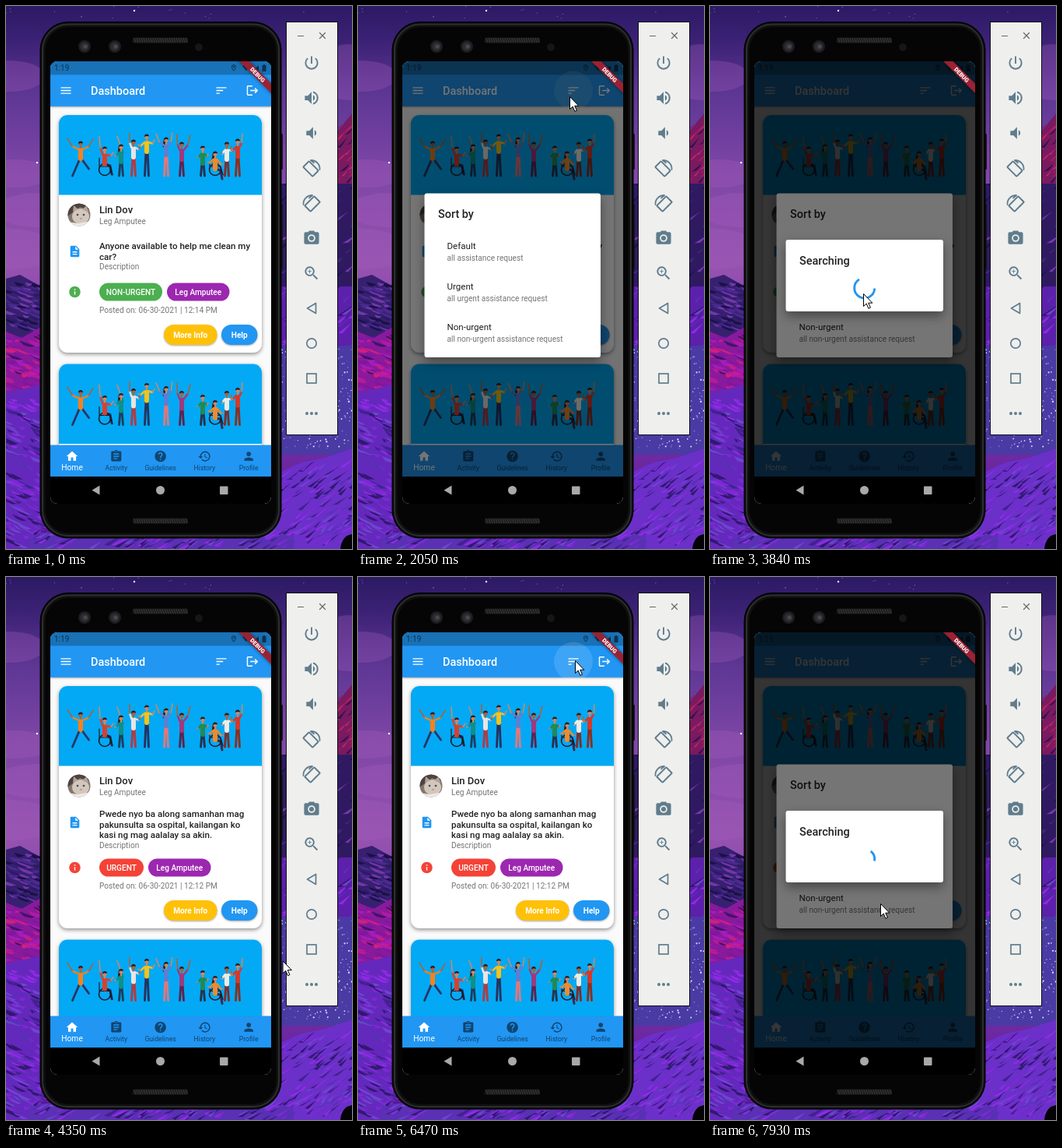
These frames come from a looping animation (445 px wide and 697 px high, 8000 ms). An HTML page:

```html
<!DOCTYPE html>
<html lang="en">
<head>
<meta charset="utf-8">
<title>Dashboard demo</title>
<style>
html, body { margin: 0; width: 100%; height: 100%; overflow: hidden; background: #24184f; }
svg { display: block; width: 445px; height: 697px; font-family: Roboto, sans-serif; }
.card { filter: drop-shadow(0 2px 2.5px rgba(0,0,0,.42)); }
.btn { filter: drop-shadow(0 1px 1px rgba(0,0,0,.35)); }
.dlg { filter: drop-shadow(0 6px 7px rgba(0,0,0,.4)); }
</style>
</head>
<body>
<svg id="stage" viewBox="0 0 445 697" xmlns="http://www.w3.org/2000/svg"></svg>
<script>
const LOOP = 8000;
const BLUE = '#2196f3', INK = '#212121', GRAY = '#757575', STEEL = '#607d8b', DIM = '#0f4570';

const ICONS = {
  menu: 'M3 18h18v-2H3zm0-5h18v-2H3zm0-7v2h18V6z',
  sort: 'M3 18h6v-2H3zM3 6v2h18V6zm0 7h12v-2H3z',
  logout: 'M17 7l-1.4 1.4L18.2 11H8v2h10.2l-2.6 2.6L17 17l5-5zM4 5h8V3H4a2 2 0 0 0-2 2v14a2 2 0 0 0 2 2h8v-2H4z',
  doc: 'M14 2H6a2 2 0 0 0-2 2v16a2 2 0 0 0 2 2h12a2 2 0 0 0 2-2V8zm2 16H8v-2h8zm0-4H8v-2h8zm-3-5V3.5L18.5 9z',
  info: 'M12 2a10 10 0 1 0 0 20a10 10 0 0 0 0-20zm1 15h-2v-6h2zm0-8h-2V7h2z',
  home: 'M10 20v-6h4v6h5v-8h3L12 3 2 12h3v8z',
  task: 'M19 3h-4.2a3 3 0 0 0-5.6 0H5a2 2 0 0 0-2 2v14a2 2 0 0 0 2 2h14a2 2 0 0 0 2-2V5a2 2 0 0 0-2-2zm-7 0a1 1 0 1 1 0 2a1 1 0 0 1 0-2zm2 14H7v-2h7zm3-4H7v-2h10zm0-4H7V7h10z',
  help: 'M12 2a10 10 0 1 0 0 20a10 10 0 0 0 0-20zm1 17h-2v-2h2zm2.1-7.7l-.9.9c-.8.7-1.2 1.3-1.2 2.8h-2v-.5c0-1.1.5-2.1 1.2-2.8l1.2-1.3a2 2 0 1 0-3.4-1.4H8a4 4 0 1 1 7.1 2.3z',
  history: 'M13 3a9 9 0 0 0-9 9H1l4 4 4-4H6a7 7 0 1 1 2 5l-1.4 1.4A9 9 0 1 0 13 3zm-1 5v5l4.3 2.5.7-1.2-3.5-2.1V8z',
  person: 'M12 12a4 4 0 1 0 0-8a4 4 0 0 0 0 8zm0 2c-2.7 0-8 1.3-8 4v2h16v-2c0-2.7-5.3-4-8-4z',
  power: 'M13 3h-2v10h2zm4.8 2.2l-1.4 1.4a7 7 0 1 1-8.8 0L6.2 5.2a9 9 0 1 0 11.6 0z',
  loud: 'M3 9v6h4l5 5V4L7 9zm13.5 3A4.5 4.5 0 0 0 14 8v8a4.5 4.5 0 0 0 2.5-4zM14 3.2v2.1a7 7 0 0 1 0 13.4v2.1a9 9 0 0 0 0-17.6z',
  quiet: 'M18.5 12A4.5 4.5 0 0 0 16 8v8a4.5 4.5 0 0 0 2.5-4zM5 9v6h4l5 5V4L9 9z',
  camera: 'M12 8.8a3.2 3.2 0 1 0 0 6.4a3.2 3.2 0 0 0 0-6.4zM9 2L7.2 4H4a2 2 0 0 0-2 2v12a2 2 0 0 0 2 2h16a2 2 0 0 0 2-2V6a2 2 0 0 0-2-2h-3.2L15 2zm3 15a5 5 0 1 1 0-10a5 5 0 0 1 0 10z',
  zoom: 'M15.5 14h-.8l-.3-.3A6.5 6.5 0 1 0 13.7 14.4l.3.3v.8l5 5 1.5-1.5zm-6 0a4.5 4.5 0 1 1 0-9a4.5 4.5 0 0 1 0 9zM12 10h-2v2H9v-2H7V9h2V7h1v2h2z',
  pin: 'M12 2a7 7 0 0 0-7 7c0 5.2 7 13 7 13s7-7.8 7-13a7 7 0 0 0-7-7zm0 2a5 5 0 0 1 5 5c0 2.9-2.9 7.2-5 9.9C9.9 16.2 7 11.9 7 9a5 5 0 0 1 5-5zm0 2.5a2.5 2.5 0 1 0 0 5a2.5 2.5 0 0 0 0-5z'
};

const rect = (x, y, w, h, fill, r = 0, extra = '') =>
  `<rect x="${x}" y="${y}" width="${w}" height="${h}" rx="${r}" fill="${fill}" ${extra}/>`;
const circle = (x, y, r, fill, extra = '') => `<circle cx="${x}" cy="${y}" r="${r}" fill="${fill}" ${extra}/>`;
const path = (d, fill, extra = '') => `<path d="${d}" fill="${fill}" ${extra}/>`;
const line = (d, color, w, extra = '') =>
  path(d, 'none', `stroke="${color}" stroke-width="${w}" stroke-linecap="round" stroke-linejoin="round" ${extra}`);
const text = (s, x, y, size, fill, weight = 400, anchor = 'start') =>
  `<text x="${x}" y="${y}" font-size="${size}" fill="${fill}" font-weight="${weight}" text-anchor="${anchor}">${s}</text>`;
const icon = (name, x, y, fill, size = 17.4) =>
  path(ICONS[name], fill, `fill-rule="evenodd" transform="translate(${x - size / 2} ${y - size / 2}) scale(${size / 24})"`);
const gradient = (id, ...stops) =>
  `<linearGradient id="${id}" x2="0" y2="1">${stops.map(([o, c]) => `<stop offset="${o}" stop-color="${c}"/>`).join('')}</linearGradient>`;

let seed = 11;
const rnd = (a = 0, b = 1) => a + (b - a) * ((seed = seed * 16807 % 2147483647) / 2147483647);
const many = (n, f) => Array.from({ length: n }, (_, i) => f(i)).join('');

// Thin slivers of rock that lean along a slope
const rocks = (n, x0, x1, y0, y1, colors, lean) => many(n, () => {
  const w = rnd(8, 24), h = rnd(1.5, 4);
  return path(`M${rnd(x0, x1).toFixed(1)} ${rnd(y0, y1).toFixed(1)}l${w} ${w * lean - h}l${-w * .3} ${h - w * lean * .2}l${-w * .4} ${h * .9 - w * lean * .5}z`,
    colors[Math.floor(rnd(0, colors.length))]);
});

function scenery() {
  const violet = ['#8f2be4', '#7a2ad2', '#30196f', '#5a2fb8', '#6e45cf', '#43208f'];
  const dusk = ['#1b1148', '#4a2a90', '#7238ac', '#2d1a66'];
  const magenta = ['#c01a94', '#a51cba', '#421468', '#7d189e', '#d0207e'];
  return rect(0, 0, 445, 697, 'url(#sky)') +
    [[4, 90, 46, 20], [10, 215, 50, 18], [40, 262, 55, 22], [5, 312, 60, 26], [440, 85, 40, 36]].map(([x, y, a, b]) =>
      `<ellipse cx="${x}" cy="${y}" rx="${a}" ry="${b}" fill="#a55cba" opacity=".3"/>`).join('') +
    many(16, () => circle(rnd(0, 445), rnd(0, 19), .5, '#a98bd8')) +
    circle(165, 6, 1.2, '#fff') + circle(40, 201, 1.2, '#fff') +
    path('M0 350L18 345 45 360V430H0z', '#37206f') + rocks(60, -14, 42, 354, 412, dusk, .5) +
    path('M0 418L20 426 45 412V500H0z', '#8a1a9c') + rocks(70, -14, 42, 420, 490, magenta, .5) +
    path('M0 496L45 486V697H0z', '#6428bc') + rocks(170, -14, 48, 498, 697, violet, .6) +
    path('M427 160L445 138V240H427z', '#7a1a60') + rocks(36, 414, 445, 156, 228, ['#c02468', '#7c1a66', '#2e1450', '#a01c60'], -.7) +
    rect(350, 228, 95, 140, '#2f1a62') + rocks(60, 346, 445, 230, 360, dusk, -.5) +
    rect(350, 360, 95, 80, '#5c20aa') + rocks(60, 346, 445, 362, 440, violet, -.5) +
    rect(350, 436, 95, 140, '#4a3aa4') +
    many(260, () => circle(rnd(352, 445), rnd(437, 568), rnd(.4, 1.2), rnd() > .4 ? '#dedcfa' : '#7f78d4')) +
    path('M340 604L380 586 410 580 445 568V697H340z', '#6a30c8') + rocks(150, 340, 445, 592, 697, violet, -.45) +
    rect(30, 676, 340, 21, '#5a30b4') + rocks(120, 30, 370, 676, 697, violet, -.3) +
    path('M430 697C431 686 436 679 445 678V697z', '#050308');
}

function phone() {
  const grille = y => rect(163, y, 71, 7, '#1c1c1c', 2) +
    many(23, i => line(`M${165 + i * 3} ${y + 1}l2 5`, '#3f3f3f', .9));
  const lens = x => circle(x, 52, 8, '#1d1d1f') + circle(x, 52, 5.5, '#2e2d33') + circle(x + 1, 52, 2.6, '#50444c');
  return rect(352, 164, 4, 46, '#161616', 1) + rect(352, 254, 4, 84, '#161616', 1) +
    rect(44, 20.5, 310, 662.5, '#0a0a0a', 36, 'stroke="#000"') +
    rect(47, 23.5, 304, 656.5, '#101010', 33, 'stroke="#2e2e2e" stroke-width="2"') +
    rect(50.5, 27, 297, 649.5, '#050505', 30) +
    lens(101) + lens(140) + circle(248, 53, 5, '#161618') + grille(40.5) + grille(657.5);
}

// x, head y, shirt, trousers, left hand, right hand, seated
const CROWD = [
  [96, 177, '#f5821f', '#2a3566', 79, 170, 112, 171],
  [127, 184, '#d9402f', '#27305c', 120, 167, 138, 188, 1],
  [148, 181, '#0f8f86', '#1c3f5c', 140, 192, 143, 167],
  [164, 175, '#e9e4e0', '#b23a43', 159, 163, 173, 180],
  [181, 168, '#f4c21c', '#26325e', 170, 178, 191, 172],
  [206, 172, '#5d7fd0', '#e2777c', 193, 164, 214, 163],
  [226, 178, '#a0387e', '#5b2450', 220, 165, 237, 166],
  [253, 183, '#1f8a55', '#27324f', 246, 194, 260, 190],
  [269, 190, '#f08a2a', '#3a2a50', 260, 200, 279, 203, 1],
  [284, 178, '#f1ebe2', '#7a2f2b', 277, 188, 290, 180],
  [298, 174, '#d43a2c', '#8a2f20', 290, 184, 304, 164]
];
function person([x, y, shirt, legs, lx, ly, rx, ry, seated], i) {
  const skin = i % 3 ? '#c98a66' : '#a5643f';
  const arm = (side, hx, hy) => {
    const sx = x + side * 2.6, ex = (sx + hx) / 2 + side, ey = (y + 7 + hy) / 2 + 3;
    return line(`M${sx} ${y + 7}L${ex} ${ey}`, shirt, 2.4) + line(`M${ex} ${ey}L${hx} ${hy}`, skin, 1.6);
  };
  const hip = y + 19, kick = i ? 0 : 1;
  const lower = seated
    ? line(`M${x} ${hip}l7 2l2 11`, legs, 3) + circle(x, 210, 7.5, 'none', 'stroke="#1d1a26" stroke-width="1.6"') +
      line(`M${x - 7} ${y + 11}V206H${x + 7}l3 11`, '#1d1a26', 1.2)
    : line(`M${x - 1} ${hip}L${x - 2.5 - kick * 8} 218`, legs, 2.9) +
      line(`M${x + 1} ${hip}L${x + 2.5 + kick * 8} ${218 - kick * 9}`, legs, 2.9);
  return (i % 3 === 2 ? line(`M${x - 2} ${y}l-1 8`, '#33202b', 2.8) : '') + lower +
    line(`M${x} ${y + 8}V${hip}`, shirt, 6) + arm(-1, lx, ly) + arm(1, rx, ry) +
    line(`M${x} ${y + 2}v3`, skin, 2) + circle(x, y, 2.7, skin) +
    path(`M${x - 3} ${y}a3 3.4 0 0 1 6-.4q-3-1.6-6 .4z`, '#2d1d28');
}

const banner = y => `<g transform="translate(0 ${y - 140})">` +
  path('M68 242.4V151a11 11 0 0 1 11-11H318a11 11 0 0 1 11 11V242.4z', '#03a9f4') + '<use href="#crowd"/></g>';

function avatar() {
  return '<g clip-path="url(#face)">' + rect(79, 253, 30, 30, '#84776f') +
    path('M79 253H109V262L95 258 79 270z', '#4d4340') +
    `<ellipse cx="96" cy="270" rx="11" ry="10" fill="#d2c7bd"/>` +
    path('M86 264l1-8 6 5zM98 261l6-5 2 9z', '#b5a196') +
    circle(92, 268, 1.3, '#4b4a42') + circle(100, 268, 1.3, '#4b4a42') +
    path('M94.5 272h4l-2 2.2z', '#c58a86') + path('M79 277l14 2 16-3v8H79z', '#eee8e2') + '</g>';
}

// One post; everything below the title shifts with its number of lines
function feed(id, { lines, top, dy, tag, tagW, color, time }) {
  const bottom = 445 + dy, next = bottom + 14.5;
  const chip = (x, w, fill, s) => rect(x, 355.5 + dy, w, 23, fill, 11.5) + text(s, x + w / 2, 370.8 + dy, 10.1, '#fff', 500, 'middle');
  const button = (x, w, fill, s) => rect(x, 409 + dy, w, 26, fill, 13, 'class="btn"') + text(s, x + w / 2, 425.5 + dy, 10.1, '#fff', 700, 'middle');
  return `<g id="${id}">` +
    rect(68, 140, 261, bottom - 140, '#fff', 11, 'class="card"') + banner(140) + avatar() +
    text('Lin Dov', 120, 266, 13, INK, 500) + text('Leg Amputee', 120, 280, 10.15, GRAY) +
    icon('doc', 88.5, 315, BLUE) +
    lines.map((s, i) => text(s, 120, top + i * 13.6, 11.57, INK, 500)).join('') +
    text('Description', 120, 338.2 + dy * 1.67, 10.15, GRAY) +
    icon('info', 88.5, 367 + dy, color) + chip(120, tagW, color, tag) +
    chip(126 + tagW, 80.5, '#9c27b0', 'Leg Amputee') +
    text(`Posted on: 06-30-2021 | ${time} PM`, 120, 393.7 + dy, 10.12, GRAY) +
    button(203, 68.5, '#ffc107', 'More Info') + button(277, 46.5, BLUE, 'Help') +
    rect(68, next, 261, 305, '#fff', 11, 'class="card"') + banner(next) + '</g>';
}

function chrome() {
  const tabs = [['home', 'Home'], ['task', 'Activity'], ['help', 'Guidelines'], ['history', 'History'], ['person', 'Profile']];
  return rect(57, 71, 284, 57.8, BLUE, 0, 'class="btn"') + rect(57, 71, 284, 17.3, '#1971b6') +
    text('1:19', 62, 83, 10, '#0d3250') + icon('pin', 293, 79.5, '#0d3250', 10) +
    path('M304 77q5-4 10 0l-5 6z', '#0d3250') + path('M318 83h7v-7z', '#0d3250') +
    path('M329.5 76h1.5v-1h2v1h1.5v8h-5z', '#0d3250') +
    icon('menu', 77, 108.5, '#fff') + text('Dashboard', 109, 113.7, 14.46, '#fff', 500) +
    icon('sort', 277, 108.5, '#fff') + icon('logout', 317, 108.5, '#fff') +
    circle(277, 108.5, 25, '#fff', 'id="ripple"') +
    rect(57, 563.5, 284, 41, BLUE) +
    tabs.map(([name, s], i) => {
      const x = 85 + i * 56.8, on = i === 0;
      return icon(name, x, 578, on ? '#fff' : DIM) + text(s, x, 596.3, on ? 10.3 : 8.68, on ? '#fff' : DIM, 400, 'middle');
    }).join('') +
    rect(57, 604, 284, 36, '#000') + path('M120.5 615.5v12l-10-6z', '#a9a9a9') +
    circle(198.5, 621.5, 5.5, '#a9a9a9') + rect(275, 616.5, 10.5, 10.5, '#a9a9a9', 1);
}

const shade = rect(57, 71, 284, 533, '#000', 0, 'fill-opacity=".54"');
function dialogs() {
  const items = [['Default', ''], ['Urgent', 'urgent '], ['Non-urgent', 'non-urgent ']];
  return `<g id="sortBox">${shade}` + rect(85.5, 240.5, 226.5, 210.5, '#fff', 3, 'class="dlg"') +
    rect(85.5, 394, 226.5, 52, '#000', 0, 'id="press"') +
    text('Sort by', 103, 272, 14.46, INK, 500) +
    items.map(([s, kind], i) => text(s, 114.5, 312.3 + i * 52, 11.57, INK) +
      text(`all ${kind}assistance request`, 114.5, 327 + i * 52, 10.12, GRAY)).join('') + '</g>' +
    `<g id="searchBox">${shade}` + rect(97.5, 300, 202.5, 92, '#fff', 3, 'class="dlg"') +
    text('Searching', 115, 331.5, 14.46, INK, 500) +
    '<path id="spin" fill="none" stroke="#2196f3" stroke-width="2.9"/></g>';
}

const debugTag = '<g transform="translate(341 71) rotate(45)">' +
  rect(-32, 20.2, 64, 8.7, '#9c2133', 0, 'style="filter:drop-shadow(0 0 2px rgba(0,0,0,.5))"') +
  text('DEBUG', 0, 27.2, 7.4, '#fff', 900, 'middle') + '</g>';

function toolbar() {
  const X = 393, turn = (y, flip) => `<g transform="translate(${X} ${y}) scale(${flip} 1)">` +
    rect(-5.3, -8.6, 10.6, 17.2, 'none', 1, `transform="translate(-1 1) rotate(-45)" stroke="${STEEL}" stroke-width="2.1"`) +
    line('M-1-10A11 11 0 0 1 10.5 2M-1-10l4 3.4', STEEL, 1.8) + '</g>';
  return rect(360.5, 20.5, 66, 530, '#efefee', 0, 'stroke="#111"') +
    line('M375.5 38.5h7M403.5 34.5l7 7m0-7l-7 7', '#666', 1.2) +
    ['power', 'loud', 'quiet', , , 'camera', 'zoom'].map((n, i) => icon(n, X, 73 + i * 45, STEEL, 23)).join('') +
    turn(208, 1) + turn(253, -1) +
    line('M398.5 381.5v13l-11-6.5z', STEEL, 1.7) +
    circle(X, 433, 6.2, 'none', `stroke="${STEEL}" stroke-width="1.7"`) +
    rect(X - 6, 472, 12, 12, 'none', 0, `stroke="${STEEL}" stroke-width="1.7"`) +
    many(3, i => circle(X - 6 + i * 6, 523, 2, STEEL));
}

const $ = id => document.getElementById(id);
$('stage').innerHTML = '<defs>' +
  gradient('sky', [0, '#2c1a64'], [.06, '#3a2174'], [.16, '#5d3694'], [.3, '#7d46a6'], [.48, '#9552b0'], [1, '#5a1699']) +
  '<clipPath id="screen">' + rect(57, 71, 284, 568, '#000', 9) + '</clipPath>' +
  '<clipPath id="face">' + circle(94, 268, 14.5, '#000') + '</clipPath>' +
  `<g id="crowd">${CROWD.map(person).join('')}</g></defs>` +
  scenery() + phone() +
  '<g clip-path="url(#screen)">' + rect(57, 71, 284, 568, '#fafafa') +
  feed('before', { lines: ['Anyone available to help me clean my', 'car?'], top: 312, dy: 0,
    tag: 'NON-URGENT', tagW: 81, color: '#4caf50', time: '12:14' }) +
  feed('after', { lines: ['Pwede nyo ba along samanhan mag', 'pakunsulta sa ospital, kailangan ko', 'kasi ng mag aalalay sa akin.'],
    top: 308, dy: 6, tag: 'URGENT', tagW: 57, color: '#f44336', time: '12:12' }) +
  chrome() + dialogs() + debugTag + '</g>' + toolbar() +
  path('M.5 .5V16.5L4.2 13l2.7 6.3 2.5-1.1-2.7-6H11.8z', '#fff', 'id="cursor" stroke="#000" stroke-width="1"');

// Pointer stops: time, x, y
const MOVES = [
  [640, 412, 590], [1000, 350, 350], [1420, 272, 117], [1480, 272, 116], [2620, 272, 116], [2950, 205, 265],
  [3140, 182, 345], [3320, 197, 369], [4200, 197, 369], [4350, 355, 492], [4470, 401, 526], [4640, 401, 526],
  [5050, 324, 472], [5400, 324, 472], [5600, 339, 410], [6200, 279, 107], [6690, 279, 107], [7110, 243, 360],
  [7140, 243, 360], [7420, 219, 419], [LOOP, 219, 419]
];
const slope = (i, k) => (MOVES[i + 1][k] - MOVES[i][k]) / (MOVES[i + 1][0] - MOVES[i][0]);
function tangent(i, k) {
  if (i === 0 || i === MOVES.length - 1) return 0;
  const a = slope(i - 1, k), b = slope(i, k);
  return a * b <= 0 ? 0 : 2 * a * b / (a + b);
}
function pointer(t, k) {
  let i = 0;
  while (i < MOVES.length - 2 && t >= MOVES[i + 1][0]) i++;
  const [p, q] = [MOVES[i], MOVES[i + 1]], d = q[0] - p[0], u = (t - p[0]) / d, v = 1 - u;
  return p[k] * v * v * (1 + 2 * u) + q[k] * u * u * (1 + 2 * v) +
    d * u * v * (tangent(i, k) * v - tangent(i + 1, k) * u);
}

const clamp = v => Math.max(0, Math.min(1, v));
const ramp = (t, a, b) => clamp((t - a) / (b - a));
const pulse = (t, a, b, c, d) => ramp(t, a, b) - ramp(t, c, d);

// cubic-bezier(.4, 0, .2, 1)
function fastOutSlowIn(x) {
  let lo = 0, hi = 1, s;
  for (let i = 0; i < 18; i++) {
    s = (lo + hi) / 2;
    if (1.2 * s * (1 - s) ** 2 + .6 * s * s * (1 - s) + s ** 3 < x) lo = s; else hi = s;
  }
  return 3 * s * s * (1 - s) + s ** 3;
}

// Indeterminate spinner: the head runs ahead, then the tail catches up
function spinner(u) {
  const p = u / 1333 % 1, head = fastOutSlowIn(clamp(p * 2)), tail = fastOutSlowIn(clamp(p * 2 - 1));
  const a = Math.PI * (-.5 + 1.5 * tail + 2 * u / 2222 + .5 * p);
  const sweep = Math.max(1.5 * Math.PI * (head - tail), .01), b = a + sweep;
  const at = r => `${198.7 + 13 * Math.cos(r)} ${362 + 13 * Math.sin(r)}`;
  return `M${at(a)}A13 13 0 ${sweep > Math.PI ? 1 : 0} 1 ${at(b)}`;
}

function fade(id, v) {
  $(id).style.display = v > 0 ? '' : 'none';
  $(id).setAttribute('opacity', v);
}

function draw(t) {
  fade('before', t < 4225 ? 1 : 0);
  fade('after', t < 4225 ? 0 : 1);
  fade('ripple', .13 * (pulse(t, 1780, 1850, 2060, 2130) + pulse(t, 6320, 6400, 6600, 6760)));
  fade('sortBox', pulse(t, 1850, 2010, 4220, 4345) + ramp(t, 6510, 6670));
  fade('press', .1 * pulse(t, 7600, 7680, 7760, 7900));
  fade('searchBox', pulse(t, 3430, 3580, 4200, 4310) + ramp(t, 7750, 7900));
  $('spin').setAttribute('d', spinner(Math.max(0, t < 5000 ? t - 3440 : t - 7765)));
  fade('cursor', t < 640 ? 0 : 1);
  $('cursor').setAttribute('transform', `translate(${pointer(Math.max(t, 640), 1)} ${pointer(Math.max(t, 640), 2)})`);
}

const start = performance.now();
function tick() {
  draw((performance.now() - start) % LOOP);
  requestAnimationFrame(tick);
}
tick();
</script>
</body>
</html>
```
